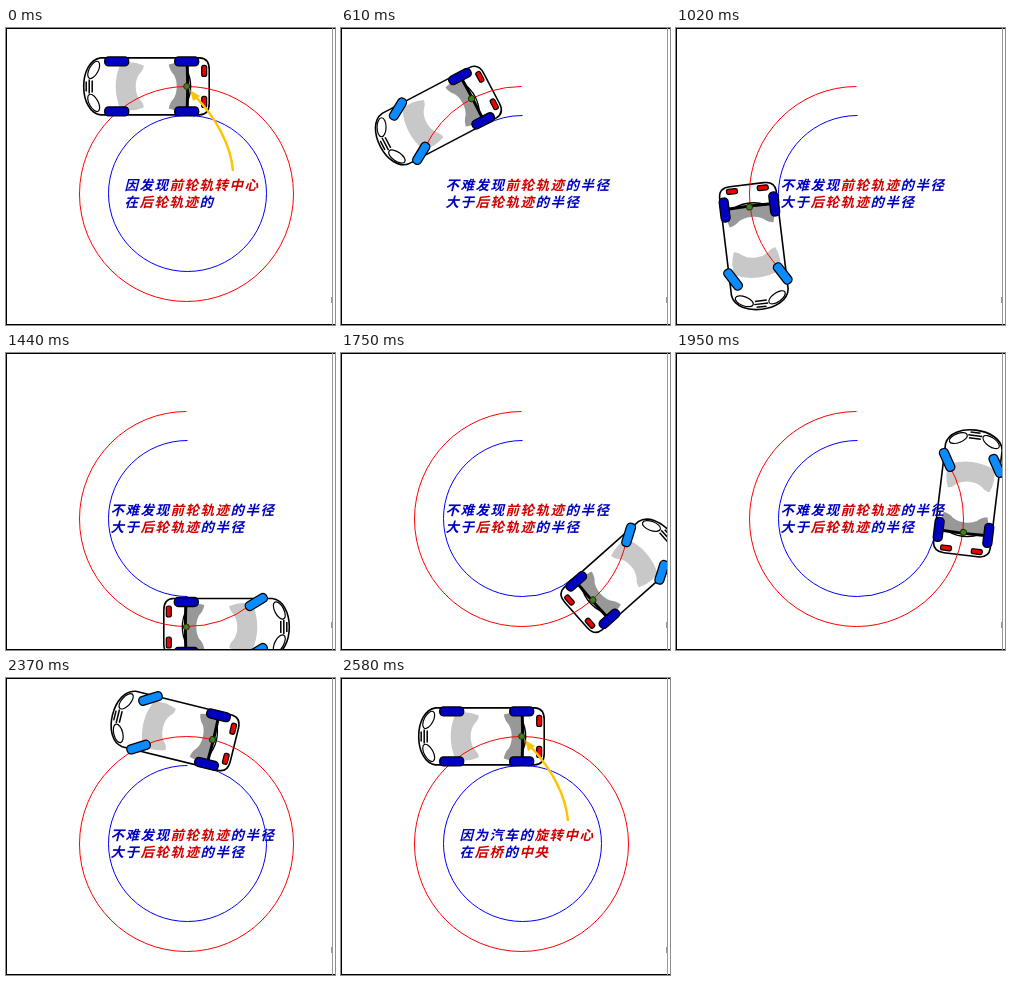
Recreate the animation shown at these times as an HTML page. Size 329 by 297 pixels, loop 4580 ms.

```html
<!DOCTYPE html>
<html lang="zh-CN">
<head>
<meta charset="utf-8">
<title>后轮轨迹</title>
<style>
  html, body { margin: 0; width: 100%; height: 100%; overflow: hidden; background: #fff; }
  svg { display: block; width: 100%; height: 100%; }
  .trace { fill: none; }
  .wheel { stroke: #000; stroke-width: 1.3; fill: #0000c0; }
  .turning .front { fill: #0a8cff; }
  .lamp { fill: #fff; stroke: #000; stroke-width: 1.2; }
  .tail { fill: #f00000; stroke: #000; stroke-width: 1.2; }
  text {
    font: italic bold 13.5px "Noto Sans CJK SC", "Noto Sans CJK", sans-serif;
    letter-spacing: 1.5px; fill: #0000c0;
  }
  .red { fill: #d00000; }
</style>
</head>
<body>
<svg viewBox="0 0 329 297">
  <defs>
    <clipPath id="stage"><rect width="326" height="297"/></clipPath>
    <rect id="tyre" x="-12" y="-4.5" width="24" height="9" rx="4"/>
  </defs>
  <rect width="329" height="297" fill="#fff"/>
  <g clip-path="url(#stage)">
    <ellipse id="blue" class="trace" rx="78" ry="79" pathLength="360" stroke="#00f"
             transform="matrix(0 -1 -1 0 181.500 165.500)"/>

    <!-- Car parts are placed around the rear axle centre, nose to the left. -->
    <g class="car">
      <path d="M-86 -28.5 H13 Q22.500 -28 22.500 -17 V17 Q22.500 28 13 28.500 H-86
               C-97 27 -103 14 -103 0 S-97 -27 -86 -28.500Z"
            fill="#fff" stroke="#000" stroke-width="1.6"/>
      <path d="M-66 -23 Q-71 -12 -71 0 T-66 23 Q-55 26 -43 21 Q-43 17 -47 13
               Q-51 8 -51 0 T-47 -13 Q-43 -17 -43 -21 Q-55 -26 -66 -23Z"
            fill="#c8c8c8"/>
      <path d="M-18 -22 Q-10 -25 0 -22 V22 Q-10 25 -18 22 Q-17 16 -13 12
               Q-10 7 -10 0 T-13 -12 Q-17 -16 -18 -22Z" fill="#989898"/>
      <ellipse class="lamp" cx="-93" cy="-16.500" rx="4.5" ry="9.500" transform="rotate(28 -93 -16.500)"/>
      <ellipse class="lamp" cx="-93" cy="16.500" rx="4.5" ry="9.500" transform="rotate(-28 -93 16.500)"/>
      <path d="M-100.500 -5V5 M-97.500 -7V7 M-94.500 -6V6" stroke="#000" stroke-width="1.5"/>
      <rect class="tail" x="15" y="-21" width="5" height="11" rx="2"/>
      <rect class="tail" x="15" y="10" width="5" height="11" rx="2"/>
    </g>

    <ellipse id="red" class="trace" rx="107.5" ry="107" pathLength="360" stroke="#f00"
             transform="matrix(0 -1 -1 0 180.500 166)"/>

    <g class="car">
      <path d="M0 -17 Q8 0 0 17" fill="none" stroke="#000" stroke-width="1.3"/>
      <path d="M-1 -24 H2 L2.500 0 L2 24 H-1 L-.5 0Z" fill="#000"/>
      <use class="wheel" href="#tyre" y="-25"/>
      <use class="wheel" href="#tyre" y="25"/>
      <g class="front wheel" transform="translate(-70 -25)"><use class="steer" href="#tyre"/></g>
      <g class="front wheel" transform="translate(-70 25)"><use class="steer" href="#tyre"/></g>
      <circle r="3" fill="#408020" stroke="#203000"/>
    </g>
  </g>

  <g id="arrow" fill="none" stroke="#ffc400" stroke-width="2.5">
    <path d="M227 143 C225 118 211 91 189 68"/>
    <path d="M184 62 L194 68 L187 73Z" fill="#ffc400" stroke="none"/>
  </g>

  <g class="caption">
    <text x="118.5" y="162">因发现<tspan class="red">前轮轨转中心</tspan></text>
    <text x="118.5" y="179">在<tspan class="red">后轮轨迹</tspan>的</text>
  </g>
  <g class="caption">
    <text x="104.5" y="162">不难发现<tspan class="red">前轮轨迹</tspan>的半径</text>
    <text x="104.5" y="179">大于<tspan class="red">后轮轨迹</tspan>的半径</text>
  </g>
  <g class="caption">
    <text x="118.5" y="162">因为汽车的<tspan class="red">旋转中心</tspan></text>
    <text x="118.5" y="179">在<tspan class="red">后桥</tspan>的<tspan class="red">中央</tspan></text>
  </g>

  <path d="M0 .5H329 M.5 0V297 M0 296.500H329" stroke="#000" fill="none"/>
  <path d="M326.500 0V297" stroke="#999"/>
  <path d="M325.500 269V275" stroke="#999"/>
</svg>
<script>
  const LOOP = 4580, DRIVE = 100, STOP = 2580;
  const STEP_ANGLE = 360 / 26;
  const FRONT_LEAD = 37, STEERING = -31;

  // [start time, steps travelled]; uneven because some steps are skipped
  const poses = [
    [100, 1], [610, 2], [710, 3], [810, 5], [920, 6], [1020, 7], [1120, 9],
    [1230, 10], [1330, 11], [1440, 13], [1540, 14], [1640, 15], [1750, 16],
    [1850, 18], [1950, 19], [2060, 21], [2160, 22], [2260, 23], [2370, 25], [2470, 26]
  ];

  const all = selector => [...document.querySelectorAll(selector)];
  const [svg] = all('svg'), [blue] = all('#blue'), [red] = all('#red'), [arrow] = all('#arrow');
  const cars = all('.car'), steered = all('.steer'), captions = all('.caption');

  const show = (el, on) => el.setAttribute('visibility', on ? 'visible' : 'hidden');
  const trace = (el, degrees) =>
    el.setAttribute('stroke-dasharray', degrees >= 360 ? 'none' : `${degrees} 360`);

  function draw(time) {
    const driving = time >= DRIVE && time < STOP;
    const steps = driving ? poses.findLast(([start]) => start <= time)[1] : 26;
    const angle = steps * STEP_ANGLE;
    const phase = driving ? 1 : time < DRIVE ? 0 : 2;

    cars.forEach(car => car.setAttribute('transform',
      `rotate(${-angle} 180.5 166.2) translate(180.7 58.4)`));
    steered.forEach(w => w.setAttribute('transform', `rotate(${driving ? STEERING : 0})`));
    svg.classList.toggle('turning', driving);
    trace(blue, angle);
    trace(red, angle + FRONT_LEAD);
    show(arrow, !driving);
    captions.forEach((caption, i) => show(caption, i === phase));
  }

  function tick() {
    draw(performance.now() % LOOP);
    requestAnimationFrame(tick);
  }
  tick();
</script>
</body>
</html>
```
